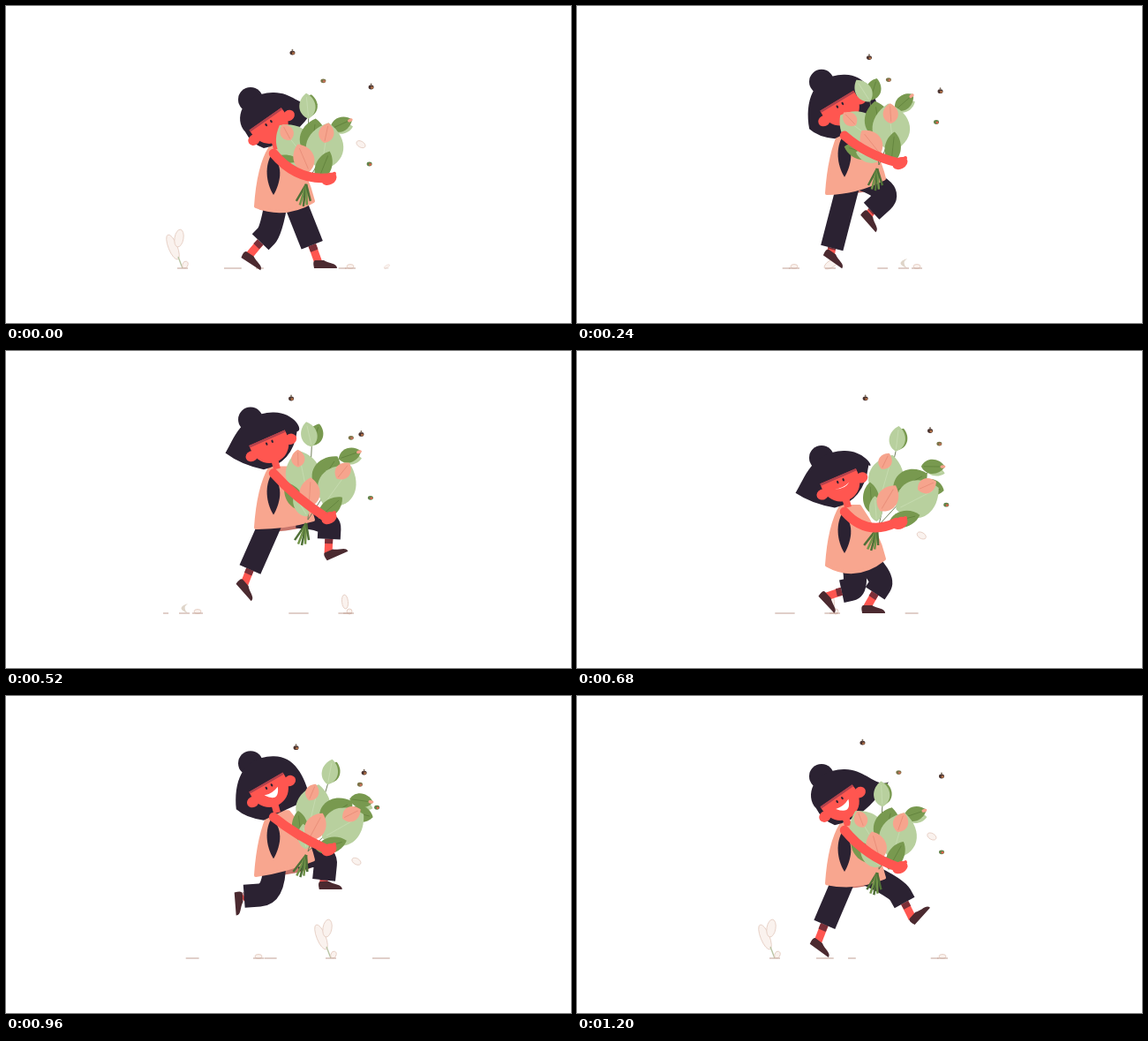
Animation, 640 px wide and 359 px high, one loop 1240 ms. Source, as an HTML page with a canvas:

```html
<!DOCTYPE html>
<html lang="en">
<head>
<meta charset="utf-8">
<title>Walking with flowers</title>
<style>
html, body { margin: 0; width: 100%; height: 100%; overflow: hidden; background: #fff; }
canvas { display: block; }
</style>
</head>
<body>
<canvas id="stage" width="640" height="359"></canvas>
<script>
const ctx = document.getElementById('stage').getContext('2d');
const LOOP = 1240, HALF = LOOP / 2, STEP = 40, RAD = Math.PI / 180;
const INK = '#2b2232', SKIN = '#ff5650', DRESS = '#f8a68f', SHADE = '#c8756b',
  PALE = '#b8d09e', DARK = '#78994f', BLUSH = '#f6a48d', SHOE = '#4b2a30', SOCK = '#7c3039';

// Neck height through one step: time, y
const bounce = [[0, 160], [60, 175], [160, 180], [220, 143], [360, 129], [460, 125], [580, 145]];

// One foot through both steps: time, ankle x, ankle y, pitch
const stride = [
  [0, 354, 289, 0], [160, 298, 289, 0], [220, 291, 284, 25], [360, 266, 224, 88],
  [460, 268, 246, 63], [620, 275, 281, 33], [780, 304, 257, 76], [980, 361, 210, -2],
  [1080, 350, 216, 0], [1200, 380, 250, -48]
];

// Bouquet, back to front: direction, distance, tilt, length, width, colour
const leaves = [
  [-30, 50, -55, 52, 39, PALE], [-55, 29, -75, 36, 18, DARK], [-2, 54, -10, 44, 30, DARK],
  [17, 48, -8, 54, 42, PALE], [12, 64, -5, 23, 17, BLUSH], [-33, 66, -45, 20, 15, BLUSH],
  [38, 27, 5, 36, 18, DARK], [-50, 17, -75, 29, 15, PALE], [-20, 29, -40, 34, 23, BLUSH]
];

const cos = deg => Math.cos(deg * RAD);
const sin = deg => Math.sin(deg * RAD);
const clamp = v => Math.min(1, Math.max(0, v));
const ramp = (t, from, to) => clamp((t - from) / (to - from));
const mod = (v, n) => (v % n + n) % n;
const polar = (x, y, deg, dist) => [x + sin(deg) * dist, y - cos(deg) * dist];

// Periodic monotone cubic through [time, ...values] points.
function spline(points, period, time) {
  const n = points.length, t = mod(time, period);
  const at = j => points[mod(j, n)][0] + period * Math.floor(j / n);
  const val = (j, c) => points[mod(j, n)][c];
  const rate = (j, c) => (val(j + 1, c) - val(j, c)) / (at(j + 1) - at(j));
  const slope = (j, c) => {
    const a = rate(j - 1, c), b = rate(j, c);
    return a * b > 0 ? 2 * a * b / (a + b) : 0;
  };
  let i = n - 1;
  while (at(i) > t) i--;
  const h = at(i + 1) - at(i), u = (t - at(i)) / h, v = 1 - u;
  return points[0].slice(1).map((_, k) => {
    const c = k + 1;
    return val(i, c) * (1 + 2 * u) * v * v + slope(i, c) * h * u * v * v +
      val(i + 1, c) * u * u * (3 - 2 * u) - slope(i + 1, c) * h * u * u * v;
  });
}

function fill(color, draw) {
  ctx.beginPath();
  draw();
  ctx.fillStyle = color;
  ctx.fill();
}
function stroke(color, width, draw) {
  ctx.beginPath();
  draw();
  ctx.strokeStyle = color;
  ctx.lineWidth = width;
  ctx.stroke();
}
function line(color, width, x1, y1, x2, y2) {
  stroke(color, width, () => { ctx.moveTo(x1, y1); ctx.lineTo(x2, y2); });
}
function oval(x, y, rx, ry, color, turn = 0) {
  fill(color, () => ctx.ellipse(x, y, rx, ry, turn * RAD, 0, 7));
}
function within(x, y, deg, draw) {
  ctx.save();
  ctx.translate(x, y);
  ctx.rotate(deg * RAD);
  draw();
  ctx.restore();
}

// Everything that follows from the time alone.
function poseAt(time) {
  const a = time / LOOP * 360, b = 2 * a;
  const [neckY] = spline(bounce, HALF, time);
  const handX = 367, handY = 184 + 11 * cos(b - 10);
  return {
    time, a, b, neckX: 304, neckY, handX, handY,
    hemX: 316, hemY: neckY + 64, hemTilt: 6 - 3 * cos(b),
    slack: neckY - 125
  };
}

function leg({ time, hemX, neckY }, delay) {
  const a = (time + delay) / LOOP * 360, bone = 38;
  const [ax, ay, pitch] = spline(stride, LOOP, time + delay);
  const hx = hemX + 14 * cos(a + 50), hy = neckY + 56;
  const dx = ax - hx, dy = ay - hy, d = Math.hypot(dx, dy);
  const bend = Math.sqrt(Math.max(0, bone * bone - d * d / 4)) / d;
  const kx = (hx + ax) / 2 + dy * bend, ky = (hy + ay) / 2 - dx * bend;
  const cover = .72 - .22 * cos(2 * a);
  const cx = kx + (ax - kx) * cover, cy = ky + (ay - ky) * cover;
  line(SKIN, 9, cx, cy, ax, ay + 2);
  line(SOCK, 9, cx, cy, cx + (ax - cx) * .35, cy + (ay - cy) * .35);
  stroke(INK, 26, () => {
    ctx.moveTo(hx, hy);
    ctx.quadraticCurveTo(kx, ky, (kx + cx) / 2, (ky + cy) / 2);
    ctx.lineTo(cx, cy);
  });
  within(ax, ay, pitch, () => fill(SHOE, () => {
    ctx.moveTo(-5, 8);
    ctx.quadraticCurveTo(-7, 0, -4, -1);
    ctx.lineTo(6, -1);
    ctx.bezierCurveTo(12, 3, 21, 2, 21, 8);
  }));
}

function dress({ neckX: x, neckY: y, hemX, hemY, hemTilt, slack }) {
  const lx = hemX - 33, rx = hemX + 32, ly = hemY + hemTilt, ry = hemY - hemTilt;
  const shape = () => {
    ctx.moveTo(x - 5, y + 1);
    ctx.quadraticCurveTo(lx + 3, ly - 45, lx, ly);
    ctx.quadraticCurveTo(hemX, hemY + 2 + slack * .4, rx, ry);
    ctx.quadraticCurveTo(rx - 7, ry - 30, x + 16, y + 1);
    ctx.closePath();
  };
  fill(DRESS, shape);
  stroke(DRESS, 4, shape);
  within(x - 3, y + 8, 0, () => fill(INK, () => {
    ctx.moveTo(0, 0);
    ctx.bezierCurveTo(-8, 12, -7, 32, 2, 46);
    ctx.bezierCurveTo(9, 34, 15, 14, 0, 0);
  }));
}

function face(time) {
  oval(-24, 1, 7, 6, SKIN);
  oval(24, 1, 7, 6, SKIN);
  fill(SKIN, () => {
    ctx.moveTo(-22, -11);
    ctx.lineTo(22, -11);
    ctx.bezierCurveTo(26, 28, -26, 28, -22, -11);
  });
  line('#b3424c', 2.5, -22, -10, 22, -10);
  if (time > 100 && time < 240) {
    line(INK, 1, -3, -3, 7, -3);
  } else {
    oval(-3, -5, 1.1, 1.8, INK);
    oval(4, -5, 1.1, 1.8, INK);
  }
  const smile = ramp(time, 660, 820) * (1 - ramp(time, 1200, LOOP));
  if (smile) {
    fill('#fff', () => {
      ctx.moveTo(-9, 1);
      ctx.quadraticCurveTo(0, 4, 9, 0);
      ctx.quadraticCurveTo(2, 4 + 13 * smile, -9, 1);
    });
  }
}

function head({ time, a, b, neckX, neckY }) {
  const lx = -41 + 12 * cos(a), ly = 14 + 9 * cos(b - 160);
  const rx = 41 + 12 * cos(a + 10), ry = -8 - 18 * cos(b);
  const by = 29 + 5 * cos(b - 170);
  within(neckX - 4, neckY - 23, 0, () => {
    oval(-23, -31, 14, 14, INK);
    fill(INK, () => {
      ctx.moveTo(lx, ly);
      ctx.bezierCurveTo(-42, -8, -34, -38, 2, -39);
      ctx.bezierCurveTo(26, -40, 38, -18, rx, ry);
      ctx.quadraticCurveTo(25, 18, -8, by);
      ctx.quadraticCurveTo((lx - 8) / 2 - 4, (by + ly) / 2 + 4, lx, ly);
    });
    line(SKIN, 8, 3, 10, 7, 25);
    within(0, 0, -29 - 6 * cos(a), () => face(time));
  });
}

function leaf(x, y, deg, len, wide, color) {
  const l = len / 2;
  within(x, y, deg, () => {
    fill(color, () => {
      ctx.moveTo(0, -l);
      ctx.bezierCurveTo(wide * .65, -l * .5, wide * .7, l * .6, 0, l);
      ctx.bezierCurveTo(-wide * .7, l * .6, -wide * .65, -l * .5, 0, -l);
    });
    const vein = { [DARK]: '#64853f', [PALE]: '#c6dbb0', [BLUSH]: '#e98e79' }[color];
    line(vein, .9, 0, -l * .7, 0, l * .8);
  });
}

function bouquet({ a, handX, handY }) {
  const x = handX - 25, y = handY + 3;
  const swing = 18 + 18 * cos(a - 235), reach = 1 - .1 * cos(a - 20);
  const top = 5 + 13 * cos(a - 250), side = top + 30, lean = 2 * side + 5;
  const [tx, ty] = polar(x, y, top, 78 * reach);
  const [sx, sy] = polar(x, y, side, 82 * reach);
  line('#6f7d58', 1, x, y, tx, ty);
  line('#6f7d58', 1, x, y, sx, sy);

  const spread = 6 + 20 * Math.max(0, sin(a));
  leaf(...polar(tx, ty, top + spread, 14), top + spread, 26, 17, DARK);
  leaf(...polar(tx, ty, top - spread, 14), top - spread, 29, 18, PALE);
  leaf(sx + 2, sy + 5, lean + 12, 23, 11, PALE);
  leaf(sx, sy, lean, 27, 16, DARK);
  oval(...polar(sx, sy, lean, 11), 3, 1.8, BLUSH, lean - 90);
  const extra = ramp(swing, 22, 31);
  if (extra) leaf(...polar(x, y, 55, 74), 105, 27 * extra, 18 * extra, DARK);

  for (let i = -2; i <= 2; i++) {
    line(i % 2 ? '#719449' : '#4f7038', 2.5,
      x - 2, y + 4, x - 4 + i * 4 - swing * .15, y + 29 - i * i * 1.5);
  }
  leaves.forEach(([dir, dist, tilt, len, wide, color]) =>
    leaf(...polar(x, y, 1.2 * swing + dir, dist * reach), 2.2 * swing + tilt, len, wide, color));
}

function arm({ neckX, neckY, handX: hx, handY: hy, slack }) {
  const sx = neckX - 1, sy = neckY + 7;
  ctx.lineCap = 'round';
  stroke(SKIN, 10.5, () => {
    ctx.moveTo(sx, sy);
    ctx.quadraticCurveTo((sx + hx) / 2 - 7, (sy + hy) / 2 + slack * .45, hx - 5, hy);
  });
  line(SKIN, 4, hx - 2, hy - 1, hx + 5, hy - 5);
  ctx.lineCap = 'butt';
  oval(hx - 1, hy + 1, 9, 6.5, SKIN, -28);
}

function bug(x, y, color, spot) {
  oval(x, y, 3, 2.4, color);
  oval(x + 1, y + .5, 1.4, 1.2, spot);
}
function bee(x, y) {
  bug(x, y, '#4b3430', '#b97549');
  oval(x, y - 3, .9, 1.4, '#7d7062');
}
function petal(x, y, rx, ry, deg) {
  oval(x, y, rx, ry, '#faf2ee', deg);
  stroke('#e5ccc1', .9, () => ctx.ellipse(x, y, rx, ry, deg * RAD, 0, 7));
}

function air({ time, a, b }) {
  bee(327 + 4 * cos(b - 130), 56 + 3 * cos(b - 170));
  bee(407 + 7 * cos(a - 20), 92 + 5 * sin(a));
  bug(414 - 7 * cos(a - 70), 152 + 27 * cos(b), '#63834a', '#e2604c');
  bug(382 + 32 * cos(a - 225), 94 + 12 * cos(a - 220), '#7b7447', '#c9705c');
  if (time < 60 || time >= 600) petal(396 + 6 * cos(a), 182 + 27 * cos(a - 200), 5.5, 3.4, 30);
}

// Plants stand on the ground line at y = 0.
const plants = {
  flower() {
    petal(-11, -24, 5, 15, -22);
    petal(-4, -34, 5, 10, 10);
    line('#b9c4a4', 1.4, -5, -13, 0, 0);
    petal(3, -4, 3, 4, 20);
  },
  sprout() { petal(-4, -13, 3.5, 8, -6); petal(1, -2, 3, 3, 0); },
  fallen() { petal(1, -5, 9, 4, -32); },
  pebble() { petal(0, -2, 4, 2.5, 0); },
  sickle() {
    fill('#dfd5c9', () => {
      ctx.moveTo(4, -11);
      ctx.quadraticCurveTo(-11, -6, 4, 0);
      ctx.quadraticCurveTo(-3, -6, 4, -11);
    });
  }
};
const ground = [['flower', 200], ['pebble', 390], ['fallen', 431], ['sickle', 514],
  ['pebble', 529], ['sprout', 700], ['pebble', 118]];

function floor({ time }) {
  const SPAN = 744, LEFT = 178, RIGHT = 441;
  const place = x => mod(x - time / LOOP * SPAN, SPAN);
  ctx.save();
  ctx.beginPath();
  ctx.rect(LEFT, 240, RIGHT - LEFT, 60);
  ctx.clip();
  ground.forEach(([kind, start]) => {
    const x = place(start), grow = ramp(RIGHT - x, 0, 25);
    ctx.save();
    ctx.translate(x, 297);
    ctx.scale(grow, grow);
    plants[kind]();
    line('#cbb0a5', 1.2, -6, 0, 6, 0);
    ctx.restore();
  });
  for (let i = 0; i < 8; i++) {
    const rand = mod(Math.sin(i * 12.9 + 4) * 4375.8, 1);
    const x = place((i + rand) * SPAN / 8);
    line('#cbb0a5', 1.2, x, 297, x + 8 + rand * 18, 297);
  }
  ctx.restore();
}

function render(time) {
  const pose = poseAt(time);
  ctx.clearRect(0, 0, 640, 359);
  ctx.lineJoin = 'round';
  floor(pose);
  oval(pose.hemX, pose.hemY, 32, 8, SHADE, -6);
  leg(pose, 0);
  leg(pose, HALF);
  dress(pose);
  head(pose);
  bouquet(pose);
  arm(pose);
  air(pose);
}

function tick() {
  render(Math.floor(performance.now() % LOOP / STEP) * STEP);
  requestAnimationFrame(tick);
}
tick();
</script>
</body>
</html>
```
